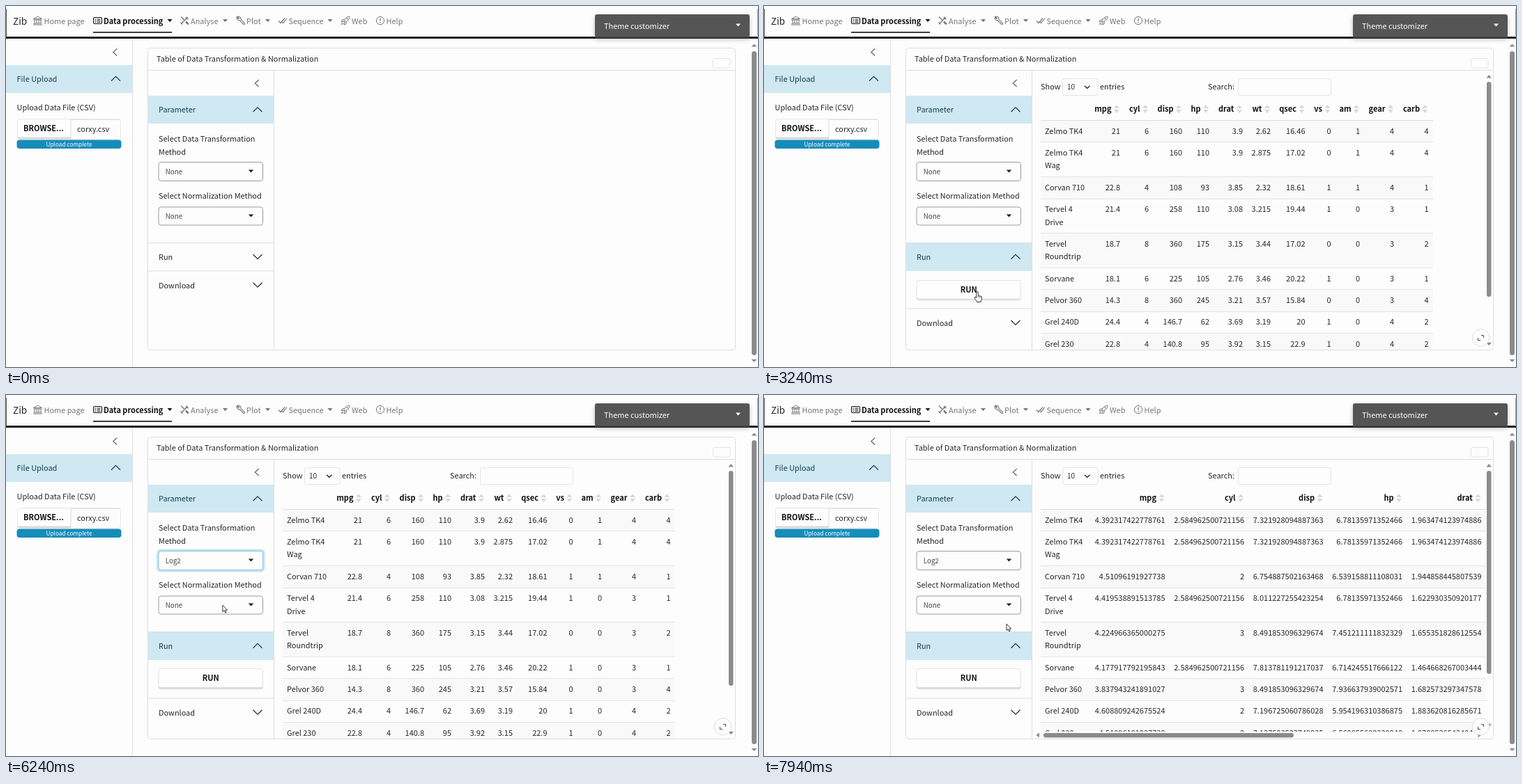
These frames come from a looping animation (1079x519 px, 7.99 s). An HTML page with a canvas:

```html
<!DOCTYPE html>
<html lang="en">
<head>
<meta charset="utf-8">
<title>Data processing</title>
<style>
html, body { margin: 0; width: 100%; height: 100%; overflow: hidden; background: #fdfdfd; }
canvas { display: block; width: 1079px; height: 519px; }
</style>
</head>
<body>
<canvas id="stage" width="1079" height="519"></canvas>
<script>
const ctx = document.getElementById('stage').getContext('2d');
const LOOP = 7990;
const FAMILY = '"Noto Sans CJK SC", "Noto Sans CJK JP", "Noto Sans CJK", "Open Sans", sans-serif';
const PAPER = '#fdfdfd', INK = '#262626', GREY = '#757575', LINE = '#dedede';
const BAND = '#d0e8f1', DEEP = '#123f50', BLUE = '#158cba';

const OPTIONS = ['None', 'Log2', 'Natural Log (LN)', 'Log10', 'Power2', 'Square Root (Sqrt)'];
const HEADS = ['mpg', 'cyl', 'disp', 'hp', 'drat', 'wt', 'qsec', 'vs', 'am', 'gear', 'carb'];
const EDGES = [511, 552, 600, 639, 687, 727, 776.5, 813.5, 855, 904, 953.5];
const CARS = [
  ['Zelmo TK4', '21 6 160 110 3.9 2.62 16.46 0 1 4 4'],
  ['Zelmo TK4|Wag', '21 6 160 110 3.9 2.875 17.02 0 1 4 4'],
  ['Corvan 710', '22.8 4 108 93 3.85 2.32 18.61 1 1 4 1'],
  ['Tervel 4|Drive', '21.4 6 258 110 3.08 3.215 19.44 1 0 3 1'],
  ['Tervel|Roundtrip', '18.7 8 360 175 3.15 3.44 17.02 0 0 3 2'],
  ['Sorvane', '18.1 6 225 105 2.76 3.46 20.22 1 0 3 1'],
  ['Pelvor 360', '14.3 8 360 245 3.21 3.57 15.84 0 0 3 4'],
  ['Grel 240D', '24.4 4 146.7 62 3.69 3.19 20 1 0 4 2'],
  ['Grel 230', '22.8 4 140.8 95 3.92 3.15 22.9 1 0 4 2']
].map(([name, row]) => ({ name: name.split('|'), cells: row.split(' ') }));

// Pointer path: time, x, y
const PATH = [
  [930, 321, 367], [1290, 321, 367], [1340, 320.5, 366], [1900, 320, 366],
  [2390, 308, 397], [2730, 306, 411], [3240, 306, 411], [4000, 325, 406],
  [4280, 332, 349], [4790, 335, 248], [4900, 334, 238], [5080, 333, 239],
  [5540, 318, 271], [5590, 316, 279], [5910, 309, 291], [6150, 309, 291],
  [6620, 328, 404], [6810, 328.5, 404.5], [7420, 328.5, 404.5], [7940, 348, 329]
];

const clamp = v => Math.max(0, Math.min(1, v));
const mix = (a, b, p) => a + (b - a) * p;
const smooth = p => p * p * (3 - 2 * p);
const ramp = (t, start, len) => smooth(clamp((t - start) / len));
const within = (t, a, b) => t >= a && t < b;

function pointer(t) {
  if (t < 180) return null;
  if (t < 930) {
    const p = 1 - (1 - (t - 180) / 750) ** 2;
    return { x: mix(646, 321, p), y: mix(-8, 367, p) };
  }
  const i = PATH.findIndex(k => k[0] > t);
  if (i < 0) return { x: 348, y: 329 };
  const a = PATH[i - 1], b = PATH[i], p = smooth((t - a[0]) / (b[0] - a[0]));
  return { x: mix(a[1], b[1], p), y: mix(a[2], b[2], p) };
}

function text(s, x, y, { size = 10.95, color = INK, bold = false, align = 'left' } = {}) {
  ctx.font = `${bold ? 700 : 400} ${size}px ${FAMILY}`;
  ctx.fillStyle = color;
  ctx.textAlign = align;
  ctx.fillText(s, x, y + 4);
}
function fill(x, y, w, h, color) {
  ctx.fillStyle = color;
  ctx.fillRect(x, y, w, h);
}
function box(x, y, w, h, r, bg, edge, lw = 1) {
  ctx.beginPath();
  ctx.roundRect(x, y, w, h, r);
  if (bg) { ctx.fillStyle = bg; ctx.fill(); }
  if (edge) { ctx.strokeStyle = edge; ctx.lineWidth = lw; ctx.stroke(); }
}
function poly(pts, color) {
  ctx.beginPath();
  for (let i = 0; i < pts.length; i += 2) ctx.lineTo(pts[i], pts[i + 1]);
  ctx.closePath();
  ctx.fillStyle = color;
  ctx.fill();
}
function stroke(d, color = INK, lw = 1.1) {
  ctx.strokeStyle = color;
  ctx.lineWidth = lw;
  ctx.stroke(new Path2D(d));
}
function at(x, y, draw, turn = 0) {
  ctx.save();
  ctx.translate(x, y);
  ctx.rotate(turn);
  draw();
  ctx.restore();
}
function tri(x, y, w, h, color) {
  poly([x - w / 2, y - h / 2, x + w / 2, y - h / 2, x, y + h / 2], color);
}
function chevron(x, y, open, color = INK) {
  at(x, y, () => stroke('M-6.5 -3.2L0 3.2L6.5 -3.2', color, 1.2), -Math.PI * open);
}
function back(x, y) {
  stroke(`M${x + 2.7} ${y - 5}L${x - 2.7} ${y}L${x + 2.7} ${y + 5}`, '#666', 1.2);
}
function shadow(color, blur, dy, draw) {
  ctx.save();
  ctx.shadowColor = color;
  ctx.shadowBlur = blur;
  ctx.shadowOffsetY = dy;
  draw();
  ctx.restore();
}

function navIcons() {
  at(45.5, 21, () => {
    stroke('M-6 -2.5L0 -6L6 -2.5ZM-6 -1H6M-4.5 -1V4M-1.5 -1V4M1.5 -1V4M4.5 -1V4M-6 4H6M-6.5 6H6.5', GREY, 1);
  });
  at(131.5, 21, () => {
    box(-6, -4.5, 12, 9, 1.5, null, '#111', 1.1);
    stroke('M-4 -2H-2.3M-4 0.2H-2.3M-4 2.4H-2.3M-1 -2H4M-1 0.2H4M-1 2.4H4', '#111', 1);
  });
  at(256.5, 21, () => {
    stroke('M-5.5 -5.5L0 0M4.5 -5L-5 4.5', GREY, 1.3);
    stroke('M1.5 1.5L5.3 5.3', GREY, 2.6);
    stroke('M2 -5.5V-2.5H5.5M-6 2.5L-3 5.5', GREY, 1.2);
  });
  at(337, 21, () => {
    stroke('M-5.2 -5.8L-2.6 -3.2L-3.2 -2.6L-5.8 -5.2C-7 -1.5 -3.5 0.3 -1.8 -0.3L4 5.4A1.2 1.2 0 0 0 5.5 3.8L-0.2 -1.8C0.5 -4 -1.8 -6.8 -5.2 -5.8Z', GREY, 1.1);
  });
  at(397, 21, () => stroke('M-6 0.5L-3 3.5L3 -3.5M-0.8 2.4L0.4 3.5L6 -3.5', GREY, 1.2));
  at(487, 21, () => {
    stroke('M-2 1C-1 -3 2 -6 6 -6C6 -2 3 1 -1 2ZM-1.5 -1.5L-4.5 -1L-6 1.5L-2 1M1.5 1.5L1 4.5L-1.5 6L-1 2M-3 3L-6 6M-4.5 2.8L-6 4.2M-2.8 4.5L-4.2 6', GREY, 1);
    box(1.5, -3.7, 2, 2, 1, GREY);
  });
  at(537, 21, () => {
    box(-5.6, -5.6, 11.2, 11.2, 5.6, null, GREY, 1);
    stroke('M0 -3.2V0.8M0 2V3.2', GREY, 1.3);
  });
}

function navbar() {
  fill(0, 44, 1079, 3, '#1c1b20');
  fill(0, 4, 1, 41, '#55555a');
  fill(1078, 4, 1, 41, '#99999c');
  text('Zib', 10, 22.5, { size: 13.5 });
  navIcons();
  const items = [['Home page', 54.5], ['Analyse', 265, 314.5], ['Plot', 345, 375.5],
    ['Sequence', 405.5, 465], ['Web', 496, 0], ['Help', 545.5, 0]];
  for (const [label, x, caret] of items) {
    text(label, x, 21.5, { color: GREY });
    if (caret) tri(caret, 21, 7, 3.8, GREY);
  }
  text('Data processing', 140, 21.5, { bold: true, color: '#111' });
  tri(235, 21, 7, 3.8, '#111');
  fill(125, 37, 113, 1.6, '#111');
  shadow('rgba(0,0,0,.25)', 6, 3, () => box(845, 12, 222, 33, 3, '#555'));
  fill(845, 44, 222, 2.5, '#414141');
  text('Theme customizer', 858, 28.5, { color: '#fff' });
  tri(1050.5, 27.5, 7, 4, '#fff');
}

function uploadPanel() {
  fill(181, 47, 1, 472, LINE);
  back(156.5, 66.5);
  fill(0, 85, 181, 40, BAND);
  text('File Upload', 15.5, 105, { color: DEEP });
  chevron(157.5, 104.5, 1, DEEP);
  text('Upload Data File (CSV)', 15.5, 146);
  box(16.5, 162.5, 148, 29, 3, PAPER, '#e6e6e6');
  fill(17, 188.5, 76, 2.5, '#d9d9d9');
  fill(92.5, 163, 1, 27, '#dadada');
  fill(94, 163, 70, 1, '#e4e4e4');
  text('BROWSE...', 25, 175.5, { size: 11, bold: true, color: '#111' });
  text('corxy.csv', 102, 177);
  box(15.5, 192.5, 150, 12.5, 4, BLUE);
  text('Upload complete', 90.5, 197.7, { size: 8.25, color: '#fff', align: 'center' });
}

function select(y, h, value, focus, open) {
  if (focus > 0) {
    ctx.globalAlpha = focus;
    box(216, y - 3, 155.5, h + 6, 6, '#c5e3ee');
    ctx.globalAlpha = 1;
  }
  box(219, y, 149.5, h, 3.5, PAPER, focus > 0.5 ? '#8ac6dd' : '#9c9c9c');
  text(value, 228.8, y + h / 2, { size: 9.75, color: '#444' });
  at(351.5, y + h / 2 - 0.5, () => tri(0, 0, 7.5, 4, '#222'), open ? Math.PI : 0);
}

function runButton(hover, press) {
  const top = 393.5 + (hover ? 1 : 0) + (press ? 1 : 0);
  box(219, top, 149.5, 423 - top, 3.5, '#dcdcdc', '#e2e2e2');
  const depth = press ? 1.5 : hover ? 2.3 : 3;
  box(219.5, top + 0.5, 148.5, 422.5 - top - depth, 3, '#fefefe');
  text('RUN', 293.7, 407.2 + (hover ? 0.8 : 0) + (press ? 0.8 : 0),
    { size: 11, bold: true, color: '#111', align: 'center' });
}

function accordion(t, hover, press) {
  const open = ramp(t, 1530, 330);
  const lit = clamp((t - 1560) / 150);
  const ring = clamp((t - 1540) / 80) * (1 - ramp(t, 2910, 140));
  const body = 55 * open - (hover ? 0.8 : 0);
  const edge = 381 + body;

  fill(204, 340, 180, 1, LINE);
  if (open > 0) {
    ctx.save();
    ctx.beginPath();
    ctx.rect(204, 381, 180, body);
    ctx.clip();
    runButton(hover, press);
    ctx.restore();
  }
  if (ring > 0) {
    ctx.globalAlpha = ring;
    fill(204, 338, 180, 46, '#c4e1ec');
    ctx.globalAlpha = 1;
    fill(204, 341, 180, 40, PAPER);
  }
  ctx.globalAlpha = lit;
  fill(204, 340.5, 180, 40.5, BAND);
  ctx.globalAlpha = 1;
  text('Run', 219, 361, { color: lit > 0.5 ? DEEP : INK });
  chevron(361, 360.5, ramp(t, 1560, 200), lit > 0.5 ? DEEP : INK);
  fill(204, Math.round(edge) - 0.5, 180, 1, LINE);
  text('Download', 219, edge + 20.5);
  chevron(361, edge + 20, 0);
}

function dropdown(t) {
  const active = t < 5590 ? 0 : 1;
  shadow('rgba(0,0,0,.22)', 8, 4, () => box(219, 254, 149.5, 131.5, 2, PAPER));
  box(219, 254, 149.5, 131.5, 2, PAPER, '#cfcfcf', 0.8);
  fill(219, 257 + active * 20.7, 149.5, 20.7, '#007bc2');
  OPTIONS.forEach((name, i) => text(name, 228.8, 267.2 + i * 20.7,
    { size: 9.7, color: i === active ? '#fff' : '#444' }));
}

function sortMark(x) {
  poly([x - 4, 147, x + 4, 147, x, 142], '#d9d9d9');
  poly([x - 4, 149, x + 4, 149, x, 154], '#d9d9d9');
}

function table(log) {
  const right = log ? 1036 : 960;
  ctx.save();
  ctx.beginPath();
  ctx.rect(386, 93, log ? 650 : 658, log ? 391 : 401);
  ctx.clip();
  text('Show', 397, 115.5);
  box(428.5, 104.5, 50.5, 24, 3, PAPER, '#e3e3e3');
  text('10', 435, 115.5, { size: 10 });
  stroke('M460 114.7L463.8 118.3L467.6 114.7', INK, 1.3);
  text('entries', 482, 115.5);
  text('Search:', 637, 115.5);
  box(680.5, 104.5, 133, 24, 3, PAPER, '#e3e3e3');

  const cols = log ? 5 : 11;
  const edge = c => log ? 575.5 + c * 113.5 : EDGES[c];
  for (let c = 0; c < cols; c++) {
    text(HEADS[c], edge(c) - 12.5, 148, { size: 11, bold: true, color: '#111', align: 'right' });
    sortMark(edge(c) - 5);
  }
  fill(397, 164, right - 397, 1, '#dcdcdc');
  let y = 164.5;
  CARS.forEach((car, i) => {
    const h = car.name.length > 1 ? 49.7 : 31.4;
    if (i % 2 === 0) fill(397, y + 0.5, right - 397, h, '#f9f9f9');
    car.name.forEach((s, n) => text(s, 403, y + 15.2 + n * 18.3));
    car.cells.slice(0, cols).forEach((v, c) => {
      const shown = log ? String(+Math.log2(v).toPrecision(16)) : v;
      text(shown, edge(c), y + 15.2, { size: 11, align: 'right' });
    });
    y += h;
    fill(397, Math.round(y - 0.5), right - 397, 1, '#e4e4e4');
  });
  ctx.restore();

  const bar = '#8b8b8b';
  poly([1036.5, 103.5, 1044, 103.5, 1040.2, 99], bar);
  box(1037, 109, 6.5, log ? 292 : 309, 3.2, bar);
  tri(1040.2, log ? 475 : 486, 7.5, 4.5, bar);
  if (log) {
    poly([395, 485.5, 395, 492.5, 390.5, 489], bar);
    poly([1024.5, 485.5, 1024.5, 492.5, 1029, 489], bar);
    box(401, 486, 359, 6.5, 3.2, bar);
  }
}

function expandButton() {
  box(1016.2, 464.5, 24.5, 24.5, 12.2, 'rgba(253,253,253,.92)', '#dedede');
  stroke('M1029 473.5H1032.5V477M1028 480.5H1024.5V477', '#555', 1.1);
}

function hand(x, y) {
  at(x, y, () => {
    const shape = new Path2D('M-1.3 8.6V1A1.3 1.3 0 0 1 1.3 1V5.4Q2.4 4.7 3.3 5.8Q4.4 5.2 5 6.4Q6.4 6 6.4 7.6V10.5Q6.2 12.2 5.2 13.2V14.6H-0.6V13.4L-3.8 9.2Q-4.4 7.6 -3 7.3Q-2 7.4 -1.3 8.6Z');
    ctx.fillStyle = '#fff';
    ctx.fill(shape);
    ctx.strokeStyle = '#222';
    ctx.lineWidth = 0.9;
    ctx.stroke(shape);
    stroke('M1.3 5.4V8M3.3 6V8.2M5 6.6V8.4', '#222', 0.7);
  });
}
function arrow(x, y) {
  at(x, y, () => {
    const shape = new Path2D('M0 0V9.6L2.2 7.6L3.7 11L5.2 10.3L3.8 7.1H6.6Z');
    ctx.fillStyle = '#fff';
    ctx.fill(shape);
    ctx.strokeStyle = '#222';
    ctx.lineWidth = 0.9;
    ctx.stroke(shape);
  });
}

function draw(t) {
  const p = pointer(t);
  const over = (y0, y1) => p && within(p.x, 204, 384) && within(p.y, y0, y1);
  const hover = t > 2000 && over(393, 424);
  const press = within(t, 2910, 3000) || within(t, 7050, 7130);
  const listed = within(t, 5000, 6150);
  const picked = t >= 6150;
  const focus = ramp(t, 4980, 140) * (1 - ramp(t, 7050, 160));

  fill(0, 0, 1079, 519, PAPER);
  navbar();
  uploadPanel();

  box(203.5, 60.5, 843, 434, 4, PAPER, LINE);
  text('Table of Data Transformation & Normalization', 216, 76);
  fill(204, 92, 842, 1, LINE);
  box(1014.5, 75.5, 24.5, 13.5, 2, PAPER, '#e4e4e4');
  if (t >= 3240) table(t >= 6500);
  fill(384, 92, 1, 402, LINE);
  if (p && (t > 930 || p.y > 61)) expandButton();

  back(360, 111);
  fill(204, 129, 180, 40, BAND);
  text('Parameter', 219, 149, { color: DEEP });
  chevron(361, 149, 1, DEEP);
  text('Select Data Transformation', 219, 191);
  text('Method', 219, 209.5);
  select(224.5, 27, picked ? 'Log2' : 'None', focus, listed);
  text('Select Normalization Method', 219, 273);
  select(289, 26, 'None', 0, false);
  accordion(t, hover, press);
  if (listed) {
    dropdown(t);
    if ((t - 5000) % 1000 < 600) fill(253, 232, 1, 12, '#222');
  }

  poly([1069.5, 58.5, 1077.5, 58.5, 1073.5, 54.5], '#8b8b8b');
  box(1070, 65, 7, 437, 3.5, '#8b8b8b');
  tri(1073.5, 510, 8, 4, '#8b8b8b');

  if (!p) return;
  const link = hover || over(340, 381) || over(224, 252) || (listed && over(252, 386));
  (link ? hand : arrow)(p.x, p.y);
}

const start = performance.now();
function tick(now) {
  draw(Math.max(0, now - start) % LOOP);
  requestAnimationFrame(tick);
}
draw(0);
requestAnimationFrame(tick);
</script>
</body>
</html>
```
